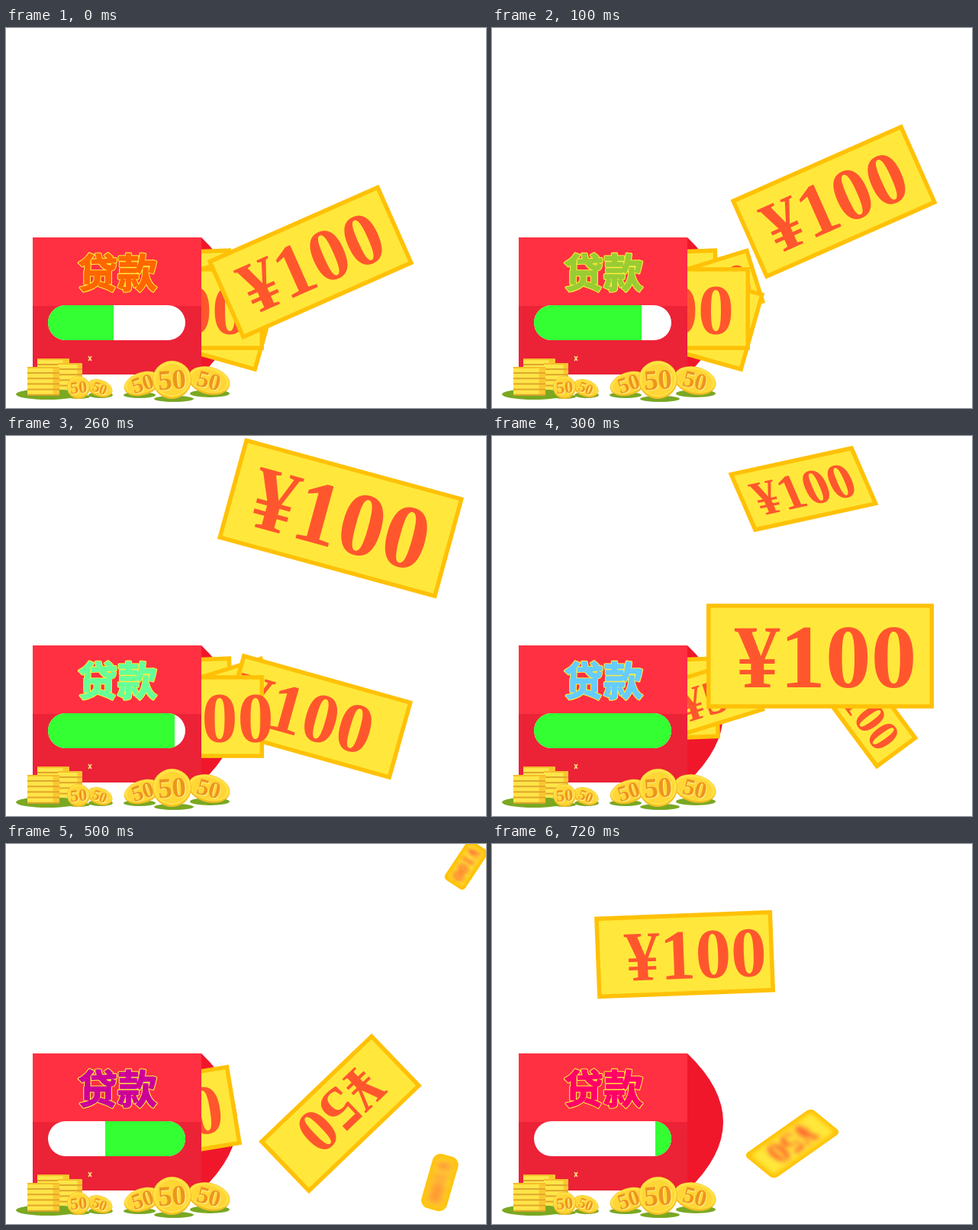
An HTML page with a canvas that plays this animation: 629x499 px, repeating every 800 ms.

```html
<!DOCTYPE html>
<html lang="zh">
<head>
<meta charset="utf-8">
<style>
html, body { margin: 0; width: 100%; height: 100%; overflow: hidden; background: #fff; }
canvas { display: block; }
</style>
</head>
<body>
<canvas id="stage" width="629" height="499"></canvas>
<script>
const ctx = document.getElementById('stage').getContext('2d');
const STEP = 100, LOOP = 800;
const SERIF = '"Liberation Serif", "Times New Roman", serif';
const CJK = '"Noto Sans CJK SC", "Noto Sans SC", "Noto Sans CJK JP", "Noto Sans CJK", sans-serif';
const GOLD = '#ffc107', YELLOW = '#ffe83b', INK = '#ff562e', GRASS = '#7aa822';

function rect(x, y, w, h, color) {
  ctx.fillStyle = color;
  ctx.fillRect(x, y, w, h);
}

function ellipse(x, y, rx, ry, color) {
  ctx.fillStyle = color;
  ctx.beginPath();
  ctx.ellipse(x, y, rx, ry, 0, 0, 2 * Math.PI);
  ctx.fill();
}

function label(text, x, y, size, color) {
  ctx.font = `bold ${size}px ${SERIF}`;
  ctx.fillStyle = color;
  ctx.fillText(text, x, y);
}

// A banknote around its centre; dx and dy shift the value on the note.
function note(x, y, w, angle, { dx = 0, dy = 0, text = '¥100', blur = 0, skew = 0, ratio = 0.458 } = {}) {
  const h = w * ratio, size = w * 0.403;
  ctx.save();
  ctx.translate(x, y);
  ctx.rotate(angle * Math.PI / 180);
  ctx.transform(1, 0, skew, 1, 0, 0);
  if (blur) {
    ctx.beginPath();
    ctx.roundRect(-w / 2 - 1, -h / 2 - 1, w + 2, h + 2, blur * 2.3);
    ctx.clip();
  }
  rect(-w / 2 - 1, -h / 2 - 1, w + 2, h + 2, GOLD);
  if (blur) ctx.filter = `blur(${blur}px)`;
  rect(4.5 - w / 2, 4.5 - h / 2, w - 9, h - 9, YELLOW);
  label(text, dx, dy + size * 0.342, size, INK);
  ctx.restore();
}

function coin(x, y, rx, ry, tilt, size) {
  ctx.save();
  ctx.translate(x, y);
  ctx.rotate(tilt * Math.PI / 180);
  ellipse(0, 0, rx, ry, '#f6bd24');
  ellipse(0, -1, rx - 1, ry - 1.5, '#ffe244');
  ellipse(0, 0, rx * 0.84, ry * 0.82, '#ffd636');
  label('50', 1, size * 0.33 + 1, size, '#fff08a');
  label('50', 0, size * 0.33, size, '#ee941f');
  ctx.restore();
}

function stack(x, y, w, bottom) {
  rect(x, y, w, bottom - y, '#ffe548');
  rect(x + w * 0.8, y, w * 0.2, bottom - y, '#fbc72f');
  rect(x, y, w, 2, '#f3bd2c');
  for (let line = y + 7; line < bottom; line += 7.2) rect(x, line, w, 2, '#e0a62c');
}

function flap() {
  ctx.fillStyle = '#f0172b';
  ctx.beginPath();
  ctx.moveTo(256, 275);
  ctx.quadraticCurveTo(350, 365, 256, 455);
  ctx.fill();
}

function title(color) {
  ctx.font = `900 52px ${CJK}`;
  ctx.lineJoin = 'round';
  for (const [width, stroke] of [[3.6, '#ffec3d'], [1.4, color]]) {
    ctx.lineWidth = width;
    ctx.strokeStyle = stroke;
    ctx.strokeText('贷款', 146, 341);
  }
  ctx.fillStyle = color;
  ctx.fillText('贷款', 146, 341);
}

function envelope(color, from, to) {
  rect(35, 275, 221, 90, '#ff3042');
  rect(35, 365, 221, 90, '#ec2237');
  title(color);

  ctx.save();
  ctx.beginPath();
  ctx.roundRect(55, 364, 180, 46, 23);
  ctx.clip();
  rect(55, 364, 180, 46, '#fff');
  rect(from, 364, to - from, 46, '#33ff33');
  ctx.restore();
}

function coins() {
  ellipse(55, 481, 42, 7, GRASS);
  ellipse(95, 484, 15, 3, GRASS);
  ellipse(124, 482, 16, 4, GRASS);
  ellipse(175, 482, 21, 4, GRASS);
  ellipse(220, 487, 26, 4, GRASS);
  ellipse(267, 480, 26, 5, GRASS);
  stack(41, 434, 42, 474);
  stack(68, 440, 32, 475);
  stack(28, 445, 42, 482);
  coin(123, 473, 17, 11, 20, 19);
  coin(95, 472, 15, 15, -5, 22);
  coin(179, 467, 25, 15, -18, 29);
  coin(266, 463, 28, 18, 14, 31);
  coin(217.5, 462, 25.5, 25, -4, 37);

  ctx.strokeStyle = '#ffe27a';
  ctx.lineWidth = 1.5;
  ctx.beginPath();
  ctx.moveTo(108, 431);
  ctx.lineTo(112, 437);
  ctx.moveTo(112, 431);
  ctx.lineTo(108, 437);
  ctx.stroke();
}

// Notes waiting in the envelope
const back = () => note(180.6, 347.5, 231, -2.2, { dx: 14 });
const fifty = () => note(269.5, 349, 160, -17.3, { text: '¥50', dx: 24 });
const tilted = x => note(x, 368.5, 230, 15.7, { dx: -17 });
const level = dx => note(220.5, 368.5, 233, 0, { dx });

const poses = [
  { color: '#ff6600', bar: [55, 141], notes() {
    back(); fifty(); tilted(231); level(2.5);
    note(399, 307.5, 244, -23.9, { dx: 1 });
  } },
  { color: '#99cc33', bar: [55, 196], notes() {
    back(); fifty(); tilted(231); level(2.5);
    note(448, 228, 244, -23.9, { dx: 1 });
  } },
  { color: '#66ff99', bar: [55, 221], notes() {
    back(); fifty(); tilted(407); level(36);
    note(438.5, 108, 295.5, 15.3);
  } },
  { color: '#66ccff', bar: [55, 235], notes() {
    back(); fifty();
    note(487.7, 358.6, 144, 53.5);
    note(430, 289, 296, 0, { dx: 7 });
    note(408, 69.5, 165, -12.3, { skew: 0.197, ratio: 0.492 });
  } },
  { color: '#9933ff', bar: [83, 235], notes() {
    note(314.5, 375, 231, -2.2, { dx: -8 });
    note(426, 330, 201, -17.3, { text: '¥50', dx: 20 });
    note(375, 50.5, 112, -11.6, { blur: 6, skew: 0.2, ratio: 0.492, dx: 4 });
    note(520, 109.5, 127, 124.4, { blur: 1.3 });
    note(567.5, 444, 72, 106, { blur: 1.3 });
  } },
  { color: '#cc0099', bar: [130, 235], notes() {
    note(187, 361, 228, -9.4, { dx: 6 });
    note(438, 354, 203, 136.2, { text: '¥50', dx: -4, dy: 3 });
    note(603, 27.5, 60, 123.5, { blur: 2.5, ratio: 0.5 });
    note(568.5, 444.5, 72, 106, { blur: 5 });
  } },
  { color: '#ff0066', bar: [214, 235], notes() {
    note(252.6, 145, 231, -2.2, { dx: 14 });
    note(393.5, 393.5, 106, 144.8, { text: '¥50', blur: 3, skew: 0.28, ratio: 0.445 });
  } },
];

function draw(time) {
  const pose = poses[Math.min(Math.floor(time % LOOP / STEP), poses.length - 1)];
  rect(0, 0, 629, 499, '#fff');
  ctx.textAlign = 'center';
  flap();
  pose.notes();
  envelope(pose.color, ...pose.bar);
  coins();
}

const start = performance.now();
function tick() {
  draw(performance.now() - start);
  requestAnimationFrame(tick);
}
tick();
</script>
</body>
</html>
```
